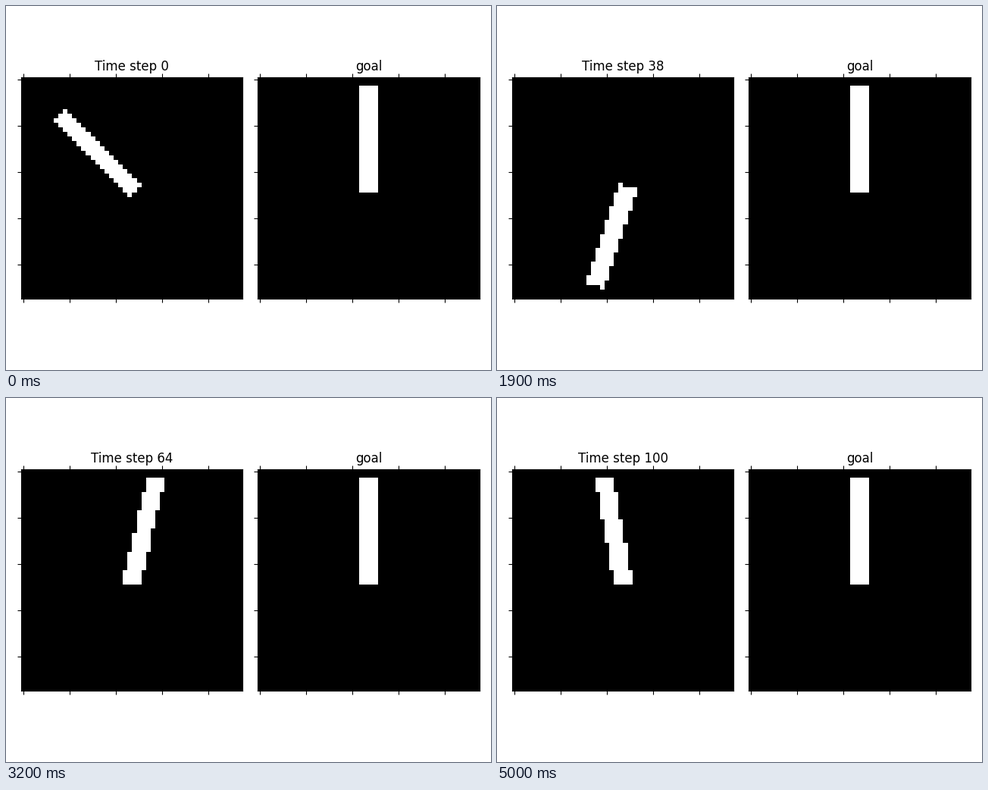
Animation of 640x480 px, one loop 5.05 s. Source, as a matplotlib script:

```python
import math

import numpy as np
import matplotlib.pyplot as plt
from matplotlib.animation import FuncAnimation

W, H, DPI = 640, 480, 100
FRAMES, INTERVAL = 101, 50
GRID, PIVOT, LENGTH, THICK = 48, 24, 22, 4

# Swing-up of the rod: steps and degrees left of upright
STEPS = np.array([0, 6, 17, 22, 27, 38, 44, 48, 55, 63])
ANGLES = np.array([45, 39, 61.5, 71, 106.5, 164, 131, 92, 28.5, -16])
SLOPES = np.gradient(ANGLES, STEPS)
SLOPES[[0, -1]] = 0


def angle_at(step):
    """Smooth swing-up, then a damped wobble around upright."""
    if step >= STEPS[-1]:
        wobble = math.cos(2 * math.pi * (step - STEPS[-1]) / 15)
        return -1.5 - 14.5 * math.exp((STEPS[-1] - step) / 90) * wobble
    i = np.searchsorted(STEPS, step, side="right") - 1
    h = STEPS[i + 1] - STEPS[i]
    t = (step - STEPS[i]) / h
    return ((1 + 2 * t) * (1 - t) ** 2 * ANGLES[i]
            + t * (1 - t) ** 2 * h * SLOPES[i]
            + t * t * (3 - 2 * t) * ANGLES[i + 1]
            + t * t * (t - 1) * h * SLOPES[i + 1])


def half_up(v):
    return int(math.copysign(math.floor(abs(v) + 0.5), v))


def half_down(v):
    return int(math.copysign(math.ceil(abs(v) - 0.5), v))


def fill_polygon(img, pts):
    """Scan-convert a convex polygon with integer corners."""
    edges = list(zip(pts, pts[1:] + pts[:1]))
    ys = [y for _, y in pts]
    for y in range(min(ys), max(ys) + 1):
        xs = []
        for (xa, ya), (xb, yb) in edges:
            if ya == yb == y:
                xs += [xa, xb]
            elif ya != yb and min(ya, yb) <= y <= max(ya, yb):
                xs.append(xa + (y - ya) * (xb - xa) / (yb - ya))
        img[y, half_up(min(xs)):half_down(max(xs)) + 1] = 1


def render(degrees):
    """Rod on a coarse grid, as a thick line with whole-pixel corners."""
    a = math.radians(degrees)
    x0 = y0 = PIVOT
    x1 = int(x0 - LENGTH * math.sin(a))
    y1 = int(y0 - LENGTH * math.cos(a))
    dx, dy = x1 - x0, y1 - y0
    size = math.hypot(dx, dy)
    half = (THICK - 1) / 2
    near, far = half_down(half) / size, half_up(half) / size
    left, right = half_down(near * dy), half_down(far * dy)
    up, down = half_down(near * dx), half_down(far * dx)
    img = np.zeros((GRID, GRID))
    fill_polygon(img, [(x0 - left, y0 + down), (x1 - left, y1 + down),
                       (x1 + right, y1 - up), (x0 + right, y0 - up)])
    return img


def panel(ax, degrees, title):
    im = ax.matshow(render(degrees), cmap="gray", vmin=0, vmax=1)
    ax.tick_params(labeltop=False, labelbottom=False, labelleft=False)
    return im, ax.set_title(title)


fig, (ax_now, ax_goal) = plt.subplots(1, 2, figsize=(W / DPI, H / DPI), dpi=DPI)
rod, caption = panel(ax_now, angle_at(0), "Time step 0")
panel(ax_goal, 0, "goal")
fig.tight_layout()


def update(step):
    rod.set_data(render(angle_at(step)))
    caption.set_text(f"Time step {step}")
    return rod, caption


anim = FuncAnimation(fig, update, frames=FRAMES, interval=INTERVAL,
                     repeat=True, repeat_delay=0)
plt.show()
```
